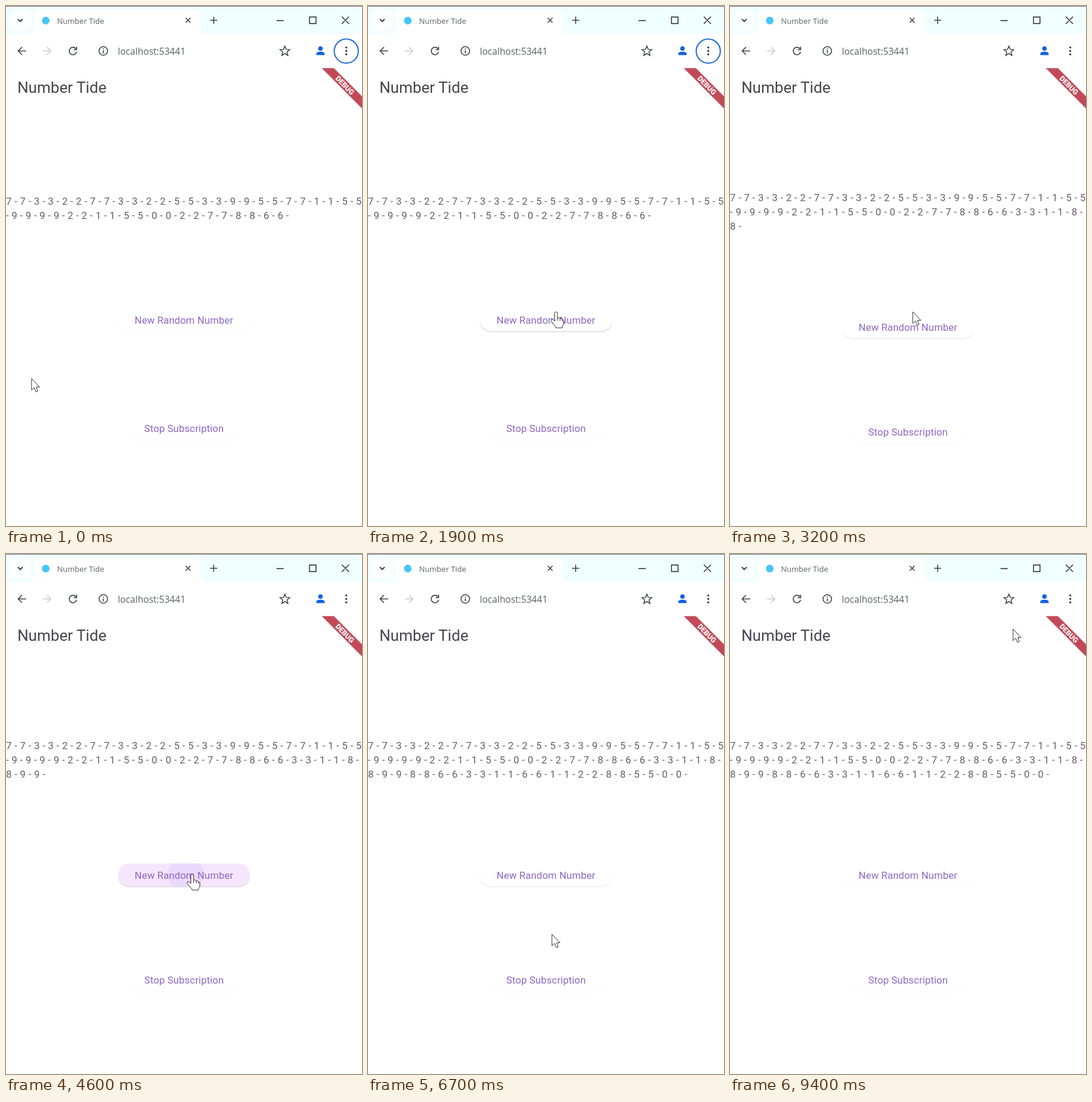
An HTML page that plays this animation: 600x874 px, repeating every 9.6 s.

```html
<!DOCTYPE html>
<html lang="en">
<head>
<meta charset="utf-8">
<title>Number Tide</title>
<style>
  html, body { margin: 0; width: 100%; height: 100%; overflow: hidden; background: #fff; }
  svg { display: block; }
  text { font: 16.8px Roboto, sans-serif; fill: #48434c; }
  .chrome { font-family: "Open Sans", sans-serif; fill: #5c6166; }
  .lines text { letter-spacing: .3px; fill: #645d68; }
  .button text { letter-spacing: .12px; text-anchor: middle; fill: #8c66c4; }
  .icon { fill: none; stroke: #3c4043; stroke-width: 1.6; }
</style>
</head>
<body>
<svg width="600" height="874" viewBox="0 0 600 874">
  <defs>
    <filter id="glow" x="-20%" y="-20%" width="140%" height="140%"><feGaussianBlur stdDeviation="1.5"/></filter>
    <clipPath id="page"><rect y="104.5" width="600" height="770"/></clipPath>
  </defs>

  <!-- Tab strip -->
  <rect width="600" height="47" fill="#f1feff"/>
  <rect width="600" height="1" fill="#66758f"/>
  <rect x="6" y="6" width="36" height="36" rx="10" fill="#fbffff"/>
  <path d="M37 47Q47 47 47 37V16Q47 6 57 6H318Q328 6 328 16V37Q328 47 338 47Z" fill="#fff"/>
  <circle cx="67" cy="24.5" r="6.5" fill="#47c5fb"/>
  <text class="chrome" x="86" y="30" style="font-size:13px">Number Tide</text>
  <g class="icon">
    <path d="M20 22L24 26L28 22" stroke-width="2"/>
    <path d="M303 20L311 28M311 20L303 28M344 24H356M350 18V30"/>
    <path d="M456 24.5H468M511.5 18.5H522.5V29.5H511.5ZM566 18L578 30M578 18L566 30" stroke="#1d1f21" stroke-width="1.4"/>
  </g>

  <!-- Toolbar -->
  <g class="icon">
    <path d="M34 75.5H21M27 69L20.5 75.5L27 82"/>
    <path d="M62 75.5H75M69 69L75.5 75.5L69 82" stroke="#c8cacc"/>
    <path d="M118 72A6.3 6.3 0 1 0 119 77M119 68.5V73.5H114"/>
    <circle cx="164" cy="75.5" r="7.2" stroke-width="1.5"/>
    <path d="M164 74.5V79.5M164 71.2V73"/>
    <path id="star" stroke-width="1.5"/>
  </g>
  <text class="chrome" x="188.5" y="81.5" style="font-size:15.6px">localhost:53441</text>
  <path d="M523 82.5V80.5Q523 76.8 530 76.8T537 80.5V82.5Z" fill="#0f62e2"/>
  <circle cx="530" cy="71.5" r="3.8" fill="#0f62e2"/>
  <g fill="#3c4043"><circle cx="573.5" cy="69.8" r="1.7"/><circle cx="573.5" cy="75.5" r="1.7"/><circle cx="573.5" cy="81.2" r="1.7"/></g>
  <circle id="ring" cx="573.5" cy="75.8" r="20.3" fill="none" stroke="#1c6ad4" stroke-width="2"/>

  <!-- App page -->
  <text x="19.2" y="146" style="font-size:26.2px">Number Tide</text>
  <g clip-path="url(#page)">
    <path d="M523 95L610 182V162L543 95Z" fill="#000" opacity=".25" filter="url(#glow)"/>
    <path d="M523 95L610 182V162L543 95Z" fill="#c24a58"/>
    <text transform="translate(571.3 133.2) rotate(45)" y="4.4" text-anchor="middle" style="font-size:12.2px;font-weight:900;fill:#fff">DEBUG</text>
  </g>
  <g class="lines"><text/><text/><text/></g>
  <g id="buttons"></g>
  <path id="cursor" fill="#fff" stroke="#2c2c30" stroke-width="1" stroke-linejoin="round"/>
</svg>

<script>
const $ = id => document.getElementById(id);
const LOOP = 9600, STEP = 100, LAG = 200;
const START = '7733227733225533995577115599992211550022778866';
const ADDED = '31898631612850';
const PRESSES = [2200, 2500, 2900, 4200, 4600, 4800, 5000, 5200, 5400, 5600, 5800, 6000, 6200, 6400, 7300, 8400, 8700];
const RELAYOUT = PRESSES[2] + LAG;
const HEIGHT = 38.4;

// Pointer hot spot: time, x, y
const PATH = [
  [0, 43, 626], [1100, 43, 626], [1700, 317, 514], [2600, 317, 514], [3100, 308, 514], [4000, 308, 514],
  [4200, 314, 538], [6500, 314, 538], [6700, 310, 639], [6900, 306, 708], [7800, 306, 708],
  [8100, 322, 568], [8300, 318, 537], [8800, 318, 537], [9400, 477, 126]
];
const ARROW = 'M0 0V19.5L4.5 15.5L7.6 22.6L10.6 21.2L7.8 14.4H13.6Z';
const HAND = 'M-2.4 16V2.4A2.3 2.3 0 0 1 2.2 2.4V10Q6.2 9 6.6 11.3Q10 10.5 10.4 13Q12.8 13 12.8 15.6V19' +
  'Q12.8 22 10.6 24.5L10 27H0Q-1 24-4.5 20.5T-8.6 14.5Q-8.5 12-6 12.6Q-4.5 13-2.4 16ZM2.2 10V15M6.6 11.3V15.5M10.4 13V16';

const buttons = [
  { label: 'New Random Number', width: 223, before: 527.5, after: 539.5 },
  { label: 'Stop Subscription', width: 192, before: 710.2, after: 716.4 }
];

$('star').setAttribute('d', 'M' + Array.from({ length: 10 }, (_, i) => {
  const r = i % 2 ? 3.8 : 8.6, a = i * Math.PI / 5;
  return [470 + r * Math.sin(a), 76 - r * Math.cos(a)].map(v => v.toFixed(1));
}).join('L') + 'Z');

$('buttons').innerHTML = buttons.map(({ label, width }, i) => {
  const pill = `x="${300 - width / 2}" y="${-HEIGHT / 2}" width="${width}" height="${HEIGHT}" rx="${HEIGHT / 2}"`;
  return `<g class="button">
    <clipPath id="pill${i}"><rect ${pill}/></clipPath>
    <rect class="shadow" ${pill}/>
    <rect ${pill} fill="#fff"/>
    <rect class="tint" ${pill} fill="#f6e6fd"/>
    <g clip-path="url(#pill${i})"><circle class="splash" fill="#ebd9fd"/></g>
    <text x="300" y="6">${label}</text></g>`;
}).join('');
document.querySelectorAll('.button').forEach((el, i) => buttons[i].el = el);
const lines = document.querySelectorAll('.lines text');

function set(el, attributes) {
  for (const name in attributes) el.setAttribute(name, attributes[name]);
}

function pointer(t) {
  const i = Math.max(1, PATH.findIndex(p => p[0] >= t));
  const [t0, x0, y0] = PATH[i - 1], [t1, x1, y1] = PATH[i];
  const k = Math.min(1, (t - t0) / (t1 - t0));
  return { x: x0 + (x1 - x0) * k, y: y0 + (y1 - y0) * k };
}

const centre = (b, t) => t < RELAYOUT ? b.before : b.after;

function hovers(b, t) {
  const p = pointer(Math.min(Math.max(0, t), 9400));
  return Math.abs(p.x - 300) < b.width / 2 && Math.abs(p.y - centre(b, t)) < HEIGHT / 2;
}

function drawNumbers(t) {
  const count = PRESSES.filter(p => p + LAG <= t).length;
  const digits = START + [...ADDED.slice(0, count)].map(d => d + d).join('');
  const text = [...digits].join(' - ') + ' -';
  const top = t < RELAYOUT ? 334 : 328;
  // Each full line holds 101 characters; the space at the break is dropped.
  lines.forEach((line, i) => {
    line.textContent = text.slice(i * 102, i * 102 + 101);
    set(line, { x: 0, y: top + i * 24 });
  });
}

function drawButton(b, t) {
  const y = centre(b, t);
  const hover = [0, 1, 2, 3].filter(n => hovers(b, t - n * STEP)).length / 4;
  const press = PRESSES.filter(p => p <= t && hovers(b, p)).pop() ?? -LOOP;
  const age = t - press, at = pointer(Math.max(0, press));
  const strength = Math.max(0, Math.min(1, (300 - age) / 200));
  const part = name => b.el.querySelector('.' + name);
  const grey = Math.round(245 - 33 * hover);
  set(b.el, { transform: `translate(0 ${y})` });
  set(part('shadow'), { fill: `rgb(${grey},${grey},${grey})`, transform: `translate(0 ${.8 + .5 * hover})` });
  set(part('tint'), { opacity: strength });
  set(part('splash'), {
    cx: at.x + (300 - at.x) * .8, cy: at.y - y,
    r: 30 + Math.min(age, 300) * .67, opacity: strength
  });
}

function draw(now) {
  const t = Math.floor(now % LOOP / STEP) * STEP;
  const { x, y } = pointer(Math.min(t, 9400));
  drawNumbers(t);
  buttons.forEach(b => drawButton(b, t));
  set($('ring'), { visibility: t < PRESSES[0] ? 'visible' : 'hidden' });
  set($('cursor'), {
    d: buttons.some(b => hovers(b, t)) ? HAND : ARROW,
    transform: `translate(${x} ${y})`
  });
}

const begin = performance.now();
function tick() {
  draw(performance.now() - begin);
  requestAnimationFrame(tick);
}
tick();
</script>
</body>
</html>
```
